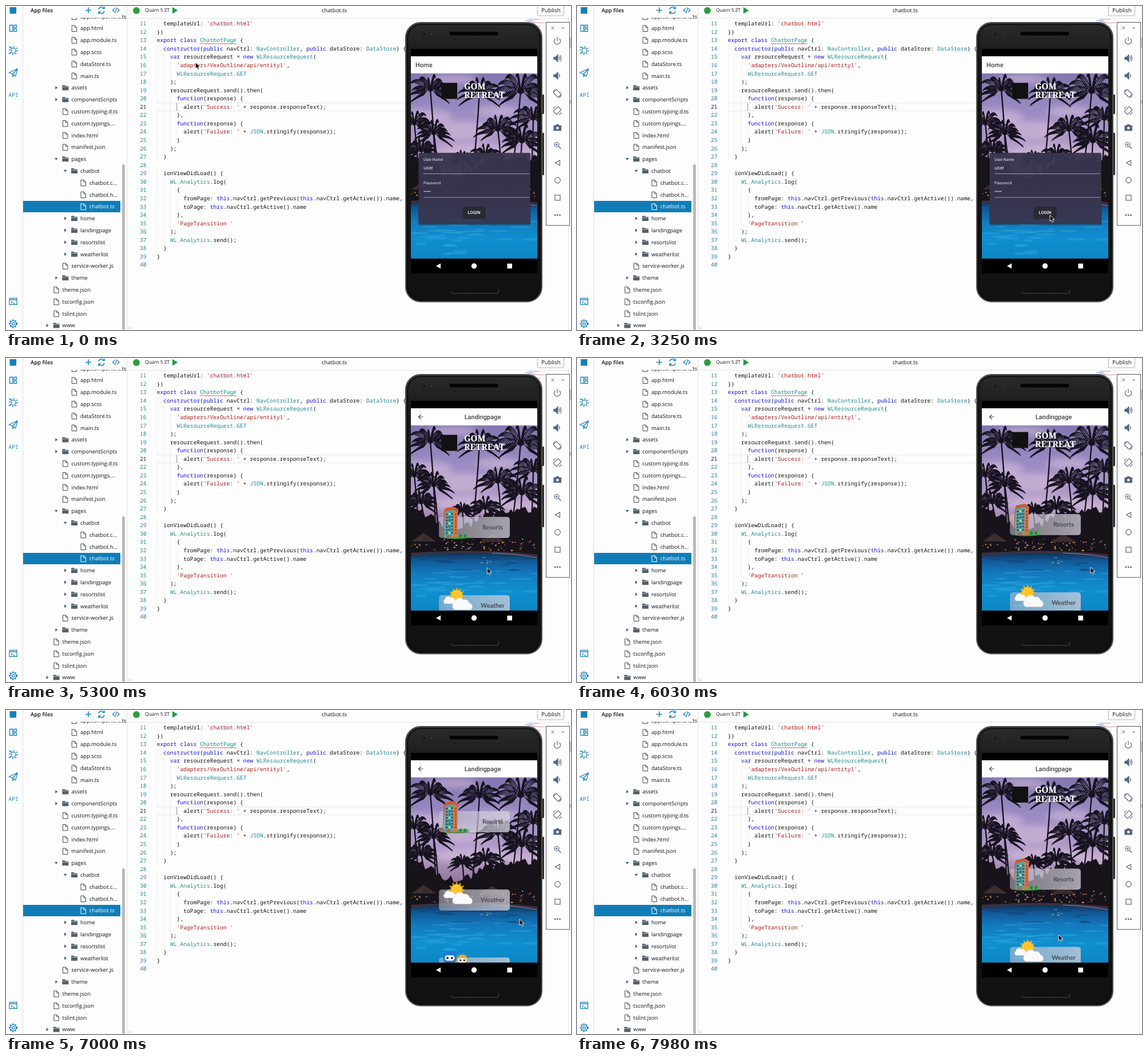
These frames come from a looping animation (988x567 px, 8 s). An HTML page:

```html
<!DOCTYPE html>
<html lang="en">
<head>
<meta charset="utf-8">
<title>App editor</title>
<style>
  html, body { margin: 0; width: 100%; height: 100%; overflow: hidden; background: #fdfdfd; }
  svg { display: block; width: 988px; height: 567px; }
  text { text-rendering: geometricPrecision; }
  .ui { font-family: "Open Sans", "Noto Sans", sans-serif; font-size: 9.45px; fill: #101418; }
  .code { font-family: "Noto Sans Mono", "DejaVu Sans Mono", monospace; font-size: 9.7px; fill: #141414; }
  .num { fill: #2b809c; text-anchor: end; }
  .key { fill: #1414d2; }
  .type { fill: #258a8e; }
  .str { fill: #b01c1c; }
  .app { font-family: Roboto, sans-serif; }
  .label { font: 700 10.8px Lato, sans-serif; fill: #4b4a55; text-anchor: middle; }
  .brand { font: 700 15px "Noto Serif", serif; fill: #fff; }
  .line { fill: none; stroke: #1b82c2; stroke-width: 1.3; }
  .tool { fill: none; stroke: #586580; stroke-width: 1.2; }
</style>
</head>
<body>
<svg id="stage" viewBox="0 0 988 567" xmlns="http://www.w3.org/2000/svg"></svg>
<script>
let seed = 77;
const rnd = () => (seed = seed * 16807 % 2147483647) / 2147483647;
const rect = (x, y, w, h, fill, more = '') =>
  `<rect x="${x}" y="${y}" width="${w}" height="${h}" fill="${fill}" ${more}/>`;
const path = (d, more = '') => `<path d="${d}" ${more}/>`;
const circle = (x, y, r, more = '') => `<circle cx="${x}" cy="${y}" r="${r}" ${more}/>`;
const oval = (x, y, rx, ry, more = '') => `<ellipse cx="${x}" cy="${y}" rx="${rx}" ry="${ry}" ${more}/>`;
const text = (x, y, s, more = '') => `<text x="${x}" y="${y}" ${more}>${s}</text>`;
const fill = c => `fill="${c}"`;

// ---- file tree: indent level, kind (f file, c closed, o open folder), name
const tree = `2f app.component.ts|2f app.html|2f app.module.ts|2f app.scss|2f dataStore.ts|2f main.ts|1c assets
1c componentScripts|1f custom.typing.d.ts|1f custom.typings....|1f index.html|1f manifest.json|1o pages|2o chatbot
3f chatbot.c...|3f chatbot.h...|3f chatbot.ts|2c home|2c landingpage|2c resortslist|2c weatherlist
1f service-worker.js|1c theme|0f theme.json|0f tsconfig.json|0f tslint.json|0c www`.split(/[|\n]/);

function treeRow(row, i) {
  const x = 98.6 + 15.7 * row[0], y = 18.2 + 20.8 * i, kind = row[1];
  const on = i === 16;
  let s = on ? rect(30, 341, 170, 20, '#117db8') : '';
  if (kind === 'f') {
    s += path(`M${x - 14.8} ${y - 5}h5l3.5 3.5v7h-8.5zM${x - 9.8} ${y - 5}v3.5h3.5`,
      `fill="none" stroke="${on ? '#fff' : '#3d4b56'}"`);
  } else {
    s += path(`M${x - 16} ${y - 4.5}h4.5l1.2 1.5h5.3v7.5h-11z`, fill('#50606c'));
    s += path(`M${x - 16} ${y - 1.6}h11`, 'stroke="#fff" stroke-width=".6"');
    s += path(kind === 'c' ? `M${x - 28} ${y - 3}l4 3l-4 3z` : `M${x - 29.5} ${y - 1.8}h6l-3 4z`, fill('#50606c'));
  }
  return s + text(x, y + 3.4, row.slice(3), on ? 'style="fill:#fff"' : '');
}

function chrome() {
  const gear = (x, y, r) => circle(x, y, r, 'class="line"') +
    circle(x, y, r + 1.3, 'class="line" stroke-dasharray="2.2 2.7" style="stroke-width:2"') +
    circle(x, y, 2.2, 'class="line"');
  let s = rect(0, 0, 988, 567, '#fdfdfd') + tree.map(treeRow).join('');
  s += rect(30, 0, 170, 20.5, '#fdfdfd');
  s += rect(203, 277, 5, 290, '#b9b9b9', 'rx="2.5"');
  s += path('M29.5 0V567M211.5 0V567', 'stroke="#dcdfe1"') + path('M212 21.5H988M983.5 22V567', 'stroke="#e3e5e7"');
  s += path('M217 561l-3 2.5l3 2.5z', fill('#c5c5c5'));
  s += text(43, 11, 'App files', 'font-weight="600"');
  s += path('M139 7.5h10M144 2.5v10', 'class="line" style="stroke-width:1.6"');
  s += path('M162 6a5.3 5.3 0 0 1 9.5-2M172 9a5.3 5.3 0 0 1-9.5 2M172 1v3.7h-3.7M162 14v-3.7h3.7',
    'class="line" style="stroke-width:1.5"');
  s += path('M190 4l-3.5 3.5l3.5 3.5M194.5 4l3.5 3.5l-3.5 3.5M193.5 2.5l-2.5 10', 'class="line"');
  s += circle(228, 8, 6, fill('#2f9e44'));
  s += text(243, 10.3, 'Quarn 5 ZT', 'style="font-size:8.3px"');
  s += path('M291 2l9.5 5.8l-9.5 5.8z', fill('#1ca04a'));
  s += text(552, 11, 'chatbot.ts') + rect(929.5, -4, 46, 21, '#fff', 'stroke="#a9b0b5" rx="1"');
  s += text(936, 10.7, 'Publish', 'style="font-size:9.9px"');

  s += rect(6.5, 2, 11.5, 11.5, '#1681b8');
  s += path('M6.5 33.5h5v11h-5zM13.5 33.5h5v4h-5zM13.5 40h5v4.5h-5z', 'class="line"');
  s += circle(13, 78, 4.3, 'class="line"') +
    circle(13, 78, 6.8, 'class="line" stroke-dasharray="1.8 3.54" style="stroke-width:2"') + path('M5 71l4 3M5 84l4-3', 'class="line"');
  s += path('M5.5 116.5L20 110L16.5 123L11.5 119.5zM11.5 119.5L20 110M11.5 119.5v4l2.5-2', 'class="line"');
  s += text(4.5, 159, 'API', 'style="fill:#1b82c2;font-size:9.6px;font-family:Noto Sans Mono,monospace"');
  s += rect(6, 511.5, 13, 11, 'none', 'class="line"') + path('M6 514h13M9 517l2 1.5l-2 1.5M12.5 520.5h3', 'class="line"');
  return `<g class="ui">${s}${gear(12.5, 556, 5.3)}</g>`;
}

// ---- editor
const source = `  templateUrl: 'chatbot.html'
})
export class ChatbotPage {
  constructor(public navCtrl: NavController, public dataStore: DataStore) {
    var resourceRequest = new WLResourceRequest(
      'adapters/VexOutline/api/entity1',
      WLResourceRequest.GET
    );
    resourceRequest.send().then(
      function(response) {
        alert('Success: ' + response.responseText);
      },
      function(response) {
        alert('Failure: ' + JSON.stringify(response));
      }
    );
  }

  ionViewDidLoad() {
    WL.Analytics.log(
      {
        fromPage: this.navCtrl.getPrevious(this.navCtrl.getActive()).name,
        toPage: this.navCtrl.getActive().name
      },
      'PageTransition '
    );
    WL.Analytics.send();
  }
}
`.split('\n');

const tokens = /('[^']*')|\b(export|class|constructor|public|var|new|function|this)\b|\b(WL\w*(?:\.(?:GET|Analytics))?|NavController|DataStore|ChatbotPage|JSON)\b/g;
const paint = s => s.replace(tokens, (m, str, key) =>
  `<tspan class="${str ? 'str' : key ? 'key' : 'type'}">${m}</tspan>`);

function editor() {
  let s = path('M264 169.5H700M264 183.5H700', 'stroke="#e6e6e6"'), guides = '';
  source.forEach((row, i) => {
    const y = 34.2 + 14.56 * i, pad = row.search(/\S|$/);
    for (let c = 0; c < pad; c += 2) guides += `M${Math.round(263.7 + c * 5.82) + 0.5} ${y - 10.5}v14.56`;
    s += text(245.5, y, i + 11, `class="num" ${i === 10 ? 'style="fill:#0b216f"' : ''}`);
    s += text(263.7 + pad * 5.82, y, paint(row.trim()));
  });
  s = path(guides, 'stroke="#ebebeb" stroke-width=".8"') + s + path('M298.5 170V183', 'stroke="#9a9a9a"');
  let d = 'M339 66';
  for (let i = 0; i < 16; i++) d += 'q1-2 2 0t2 0';
  s += path(d, 'fill="none" stroke="#e0403a" stroke-width=".9"');
  for (let i = 0; i < 8; i++) {
    const x = 907 + rnd() * 7;
    s += rect(x, 23 + i * 2, 10 + rnd() * 24, 0.9, ['#d08a9a', '#8a9ad0', '#9ab8b8'][i % 3]);
  }
  return `<g class="code">${s}</g>`;
}

// ---- backdrop
function palm(x, y, r, base) {
  let d = '';
  for (let i = 0; i < 12; i++) {
    const a = -3.6 + i * 0.375, len = r * (0.8 + rnd() * 0.35), c = Math.cos(a), n = Math.sin(a) * 0.8;
    const mx = x + c * len * 0.6, my = y + n * len - len * 0.1, ex = x + c * len, ey = y + n * len + len * 0.22;
    d += `M${x} ${y}Q${mx} ${my} ${ex} ${ey}`;
    for (let u = 0.15; u < 1; u += 0.06) {
      const v = 1 - u, leaf = r * 0.34 * (1 - u * 0.6);
      const px = v * v * x + 2 * u * v * mx + u * u * ex, py = v * v * y + 2 * u * v * my + u * u * ey;
      d += `M${px.toFixed(1)} ${py.toFixed(1)}l${(c * leaf * 0.7).toFixed(1)} ${(leaf * 0.8).toFixed(1)}`;
    }
  }
  return path(d, 'fill="none" stroke="#17121f" stroke-width="1.3"') + circle(x, y, r * 0.13, fill('#17121f')) +
    path(`M${x} ${y}Q${(x + base) / 2 + 3} ${(y + 330) / 2} ${base} 330`, 'fill="none" stroke="#1a131d" stroke-width="2.4"');
}

function photo() {
  let s = rect(708, 118, 221, 324, 'url(#sky)');
  const clouds = [[735, 195, 45, 14], [800, 218, 55, 16], [860, 185, 40, 9], [780, 128, 45, 8], [820, 255, 70, 13], [905, 262, 30, 12]];
  s += `<g filter="url(#soft)">${clouds.map(c => oval(...c, 'fill="#d6bfdb" opacity=".6"')).join('')}</g>`;
  let d = 'M708 345V262';
  for (let x = 708; x < 929; x += 5) {
    const dip = 30 * Math.exp(-(((x - 790) / 42) ** 2));
    d += `L${x} ${(260 + dip + rnd() * 16).toFixed(1)}`;
  }
  s += path(d + 'L929 262V350H708z', fill('#18121b'));
  [[742, 145, 37, 752], [900, 148, 46, 880], [828, 150, 36, 812], [714, 205, 30, 722], [748, 222, 32, 757], [860, 215, 37, 868],
   [902, 235, 40, 893], [726, 252, 30, 735], [798, 268, 22, 800], [838, 262, 29, 835], [922, 196, 36, 915]]
    .forEach(p => s += palm(...p));
  s += path('M709 321L730 306L752 321zM828 322L850 308L874 322z', fill('#3d2c2e'));
  for (let i = 0; i < 70; i++) {
    s += rect(708 + rnd() * 218, 316 + rnd() * 20, 1 + rnd() * 3, 0.8 + rnd() * 1.6,
      ['#d79b45', '#f0ca75', '#7c5638', '#a99ba4'][i % 4], 'opacity=".8"');
  }
  s += path('M708 341Q780 336 840 338T929 344V442H708z', fill('#3a303f'));
  s += path('M708 346Q780 340 840 342T929 351V442H708z', 'fill="url(#pool)"');
  s += path('M850 341.5Q900 343 929 350', 'fill="none" stroke="#8d8798" stroke-width="1.2"');
  for (let i = 0; i < 42; i++) {
    const k = rnd(), dark = k < 0.25;
    s += oval(712 + rnd() * 214, 350 + k * 88, 5 + rnd() * 16, 0.8 + k * 1.8,
      `fill="${dark ? '#0b3a68' : '#3fb2e8'}" opacity="${dark ? 0.5 : 0.32}"`);
  }
  for (let i = 0; i < 9; i++) s += rect(826 + rnd() * 20, 346 + rnd() * 13, 1 + rnd() * 3, 0.9, '#d9d3a0', 'opacity=".8"');
  return s;
}

// ---- phone screens
const brand = () => rect(761, 134.5, 28, 28, '#111') +
  `<g class="brand" filter="url(#drop)">${text(801, 145.7, 'GOM')}${text(801, 161.3, 'RETREAT')}</g>`;
const bar = () => rect(708, 88, 221, 30, '#fff') + path('M708 118H929', 'stroke="#b9b4c4" stroke-width=".7"');
const title = (x, s, more = '') => text(x, 106.8, s, `font-size="11" font-weight="500" fill="#424242" ${more}`);

function login() {
  const field = (y, name) => text(730, y, name, 'font-size="6.9"') +
    path(`M730 ${y + 23}H915`, 'stroke="#9c9aab"');
  let s = '<use href="#photo"/>' + bar() + title(716, 'Home') + brand();
  s += rect(721.5, 257, 195.5, 125, '#38344f', 'rx="2" opacity=".95" filter="url(#drop)"');
  s += `<g fill="#e6e4ee">${field(270.5, 'User Name')}${text(730, 286.3, 'user', 'font-size="8.8"')}${field(312, 'Password')}`;
  for (let i = 0; i < 4; i++) s += circle(731.6 + i * 3.2, 324.5, 1.1);
  s += '</g>' + rect(799, 351, 39, 20, '#2b2b30', 'id="button" rx="1.5" filter="url(#drop)"');
  return s + text(818.5, 363.5, 'LOGIN', 'font-size="7.6" font-weight="500" fill="#fff" text-anchor="middle"');
}

const card = (y, name) => rect(757, y, 124, 37, 'url(#glass)', 'rx="5" filter="url(#drop)"') +
  text(851, y + 22.3, name, 'class="label"');

function hotel() {
  let s = oval(786, 314, 23, 2.8, fill('#3f8f4a')) + path('M768 268L783 265V315H766z', fill('#5aa3a6')) +
    path('M783 265L790 269L789 315H782z', fill('#dd7440')) + path('M766 268L768 263L783 260L791 265V270L783 265L768 269L764 315H763z', fill('#c75b35'));
  for (let r = 0; r < 7; r++) {
    const y = 272 + r * 5.5;
    s += rect(769, y, 3.5, 3, '#28606c') + rect(774, y - 0.5, 3, 3, r % 3 ? '#28606c' : '#f0d482') +
      rect(778.5, y - 1, 3, 3, '#28606c') + rect(785.5, y, 2, 3, '#8f3f2b');
  }
  for (let i = 0; i < 5; i++) s += circle(791 + i * 4, 312 - (i % 2), 2.6, fill(i % 2 ? '#2f7d45' : '#5cab55'));
  return s + rect(770, 310, 8, 5, '#b9624a');
}

function sunCloud() {
  const x = 788, y = 416;
  let d = '';
  for (let i = 0; i < 12; i++) {
    const at = (a, r) => `${(x + Math.cos(a) * r).toFixed(1)} ${(y + Math.sin(a) * r).toFixed(1)}`, a = i * Math.PI / 6;
    d += `M${at(a - 0.17, 11)}L${at(a, 15)}L${at(a + 0.17, 11)}z`;
  }
  const cloud = (cx, cy, k) => path('M-17 10a7 7 0 0 1 0-13a9 9 0 0 1 16-5a8 8 0 0 1 11 6a6.5 6.5 0 0 1 2 12z',
    `fill="#fafafc" stroke="#cfd2da" stroke-width=".6" transform="translate(${cx} ${cy}) scale(${k})"`);
  return path(d, fill('#f6a91c')) + circle(x, y, 10.5, fill('#fcc62c')) + cloud(778, 424, 0.6) + cloud(801, 431, 0.95);
}

function bots() {
  const head = (x, y, r, c) => circle(x, y, r, fill(c)) + rect(x - r * 0.72, y - r * 0.4, r * 1.44, r * 0.8, '#f5f5f5', `rx="${r * 0.4}"`) +
    circle(x - r * 0.33, y, r * 0.17, fill('#24364a')) + circle(x + r * 0.33, y, r * 0.17, fill('#24364a'));
  return rect(768, 545, 16, 22, '#1668b8', 'rx="5"') + rect(791, 548, 13, 19, '#dd8d20', 'rx="5"') +
    head(776, 535, 12, '#1c7ad4') + head(798, 539, 10, '#f2a62b');
}

function landing() {
  return '<use href="#photo"/><g clip-path="url(#view)"><g id="scroll">' + brand() + card(278, 'Resorts') + hotel() +
    card(415, 'Weather') + sunCloud() + card(534, 'Chatbot') + bots() + '</g></g>' + bar() +
    path('M729.5 103h-7.5M725.5 99l-4 4l4 4', 'fill="none" stroke="#444" stroke-width="1.2"') +
    title(833.5, 'Landingpage', 'text-anchor="middle"');
}

function phone() {
  let s = rect(937, 155, 4, 34, '#333', 'rx="1"') + rect(937, 222, 4, 74, '#333', 'rx="1"');
  s += rect(699, 29, 238, 488.5, 'url(#shell)', 'rx="26" stroke="#505052" stroke-width="2"');
  s += rect(702.5, 32.5, 231, 481.5, 'none', 'rx="23" stroke="#0c0c0d" stroke-width="1.5"');
  s += rect(775, 44.5, 86, 7.5, '#060607', 'rx="3" stroke="#343437" stroke-width=".6"');
  s += circle(731, 49, 2, fill('#151518')) + circle(744.5, 49.5, 1.2, fill('#454549'));
  s += rect(708, 75, 221, 393, '#000');
  s += `<g class="app" clip-path="url(#screen)"><g>${login()}</g><g id="landing">${landing()}</g></g>`;
  s += path('M760 450.5v9l-8-4.5z', fill('#fff')) + circle(818.5, 455, 4.7, fill('#fff')) + rect(876.5, 450.8, 8.5, 8.5, '#fff');
  return s + path('M778.5 499v2q0 2 2 2h79q2 0 2-2v-5', 'fill="none" stroke="#4a4a4d"');
}

function toolbar() {
  const ink = '#586580';
  const speaker = y => `M958 ${y - 2}h3l4-4v12l-4-4h-3z`;
  const tilt = (y, a) => rect(958, y - 4, 12, 8, 'none', `rx="1" transform="rotate(${a} 964 ${y})"`) +
    path(`M957 ${y - 3}q1-3 4-4M971 ${y + 3}q-1 3-4 4`);
  let s = rect(944.5, 28.5, 41, 355.5, '#fdfdfd', 'stroke="#55585c"');
  s += '<g class="tool">' + path('M953.5 36l4.5 4.5M958 36l-4.5 4.5M971 38.5h5', 'stroke-width="1"');
  s += path('M960.5 57a5.6 5.6 0 1 0 7 0M964 54v7');
  s += path(speaker(91.5) + speaker(122), fill(ink)) + path('M967 88.5q2.5 3 0 6M968.5 86q4.5 5.5 0 11M967 119q2.5 3 0 6');
  s += tilt(153, 45) + tilt(183, -45);
  s += path('M958 209.5h3l1.5-2h3.5l1.5 2h3v8.5h-12.5z', fill(ink)) + circle(964.3, 213.5, 2.3, 'fill="#fff" stroke="none"');
  s += circle(963, 242.5, 4) + path('M966 245.5l4.5 4.5M961 242.5h4M963 240.5v4');
  s += path('M968.5 270v9l-8-4.5z') + circle(964.5, 305, 4.8) + rect(960, 331, 9, 9, 'none');
  s += '</g>';
  for (let i = 0; i < 3; i++) s += circle(960 + i * 4.3, 366, 1.4, fill(ink));
  return s + path('M987 55V73M985.5 165.5h3M987 165v6', 'stroke="#9a9da0"');
}

const stop = (o, c, a = 1) => `<stop offset="${o}" stop-color="${c}" stop-opacity="${a}"/>`;
const grad = (id, stops, dir = 'x2="0" y2="1"') => `<linearGradient id="${id}" ${dir}>${stops}</linearGradient>`;
const stage = document.getElementById('stage');
stage.innerHTML = '<defs>' +
  grad('sky', stop(0, '#8176ae') + stop(0.2, '#9a8bc3') + stop(0.42, '#b39cc8') + stop(0.55, '#947a9f') + stop(0.65, '#46364e')) +
  grad('pool', stop(0, '#0f3459') + stop(0.14, '#135a98') + stop(0.35, '#127abd') + stop(0.65, '#0f90d0') + stop(1, '#0c86c4')) +
  grad('shell', stop(0, '#2b2b2d') + stop(0.12, '#1b1b1c') + stop(1, '#111112')) +
  grad('glass', stop(0, '#d5d5e0', 0.45) + stop(1, '#dcdae6', 0.68), '') +
  '<filter id="soft" x="-20%" y="-20%" width="140%" height="140%"><feGaussianBlur stdDeviation="6"/></filter>' +
  '<filter id="drop" x="-10%" y="-20%" width="120%" height="150%"><feDropShadow dx="0" dy="1" stdDeviation="1" flood-opacity=".4"/></filter>' +
  `<clipPath id="screen">${rect(708, 88, 221, 354, '#000')}</clipPath>` +
  `<clipPath id="view">${rect(708, 118, 221, 324, '#000')}</clipPath>` +
  `<g id="photo">${photo()}</g></defs>` + chrome() + editor() + phone() + toolbar() +
  path('M0 0V10.8L2.5 8.5L4.3 12.3L6.2 11.4L4.5 7.7H8z', 'id="cursor" fill="#000" stroke="#fff" stroke-width=".9"');

// ---- timeline: [first step, last step, steps, x, y]
const moves = [[120, 120, 1, 327, 100], [510, 630, 2, 370, 103], [780, 1010, 3, 409, 101.5], [1128, 1360, 3, 465, 106],
  [1600, 2300, 7, 790, 320], [2900, 3250, 4, 827, 366], [5300, 5535, 3, 870, 369], [5650, 5770, 2, 898, 366],
  [7480, 7590, 2, 890, 368], [7740, 7980, 3, 842, 393]];
const scrolls = [[0, 0], [6030, 5], [6180, 31], [6330, 49], [6470, 56], [6590, 61], [6710, 64], [6860, 81], [7000, 101],
  [7150, 131], [7300, 45], [7480, 32], [7590, 23], [7740, 11], [7860, 4], [7980, 0.5]];

const trail = [[0, 331.5, 99]];
for (const [a, b, n, x, y] of moves) {
  const [, x0, y0] = trail[trail.length - 1];
  for (let k = 1; k <= n; k++) {
    const u = k / n, p = n > 3 ? u * u * (3 - 2 * u) : u;
    trail.push([n > 1 ? a + (b - a) * (k - 1) / (n - 1) : a, x0 + (x - x0) * p, y0 + (y - y0) * p]);
  }
}

const at = (list, t) => list.filter(step => step[0] <= t + 0.01).pop();
const [cursor, page, roll, button] = ['cursor', 'landing', 'scroll', 'button'].map(id => document.getElementById(id));

function draw(t) {
  const [, x, y] = at(trail, t), entering = t < 4560;
  cursor.setAttribute('transform', `translate(${x} ${y})`);
  button.setAttribute('fill', t >= 4090 && t < 4240 ? '#47474d' : '#2b2b30');
  page.style.display = t < 4380 ? 'none' : '';
  page.setAttribute('opacity', entering ? 0.95 : 1);
  page.setAttribute('transform', `translate(0 ${entering ? 1 : 0})`);
  roll.setAttribute('transform', `translate(0 ${-at(scrolls, t)[1]})`);
}

const start = performance.now();
function tick() {
  draw((performance.now() - start) % 8000);
  requestAnimationFrame(tick);
}
draw(0);
requestAnimationFrame(tick);
</script>
</body>
</html>
```
